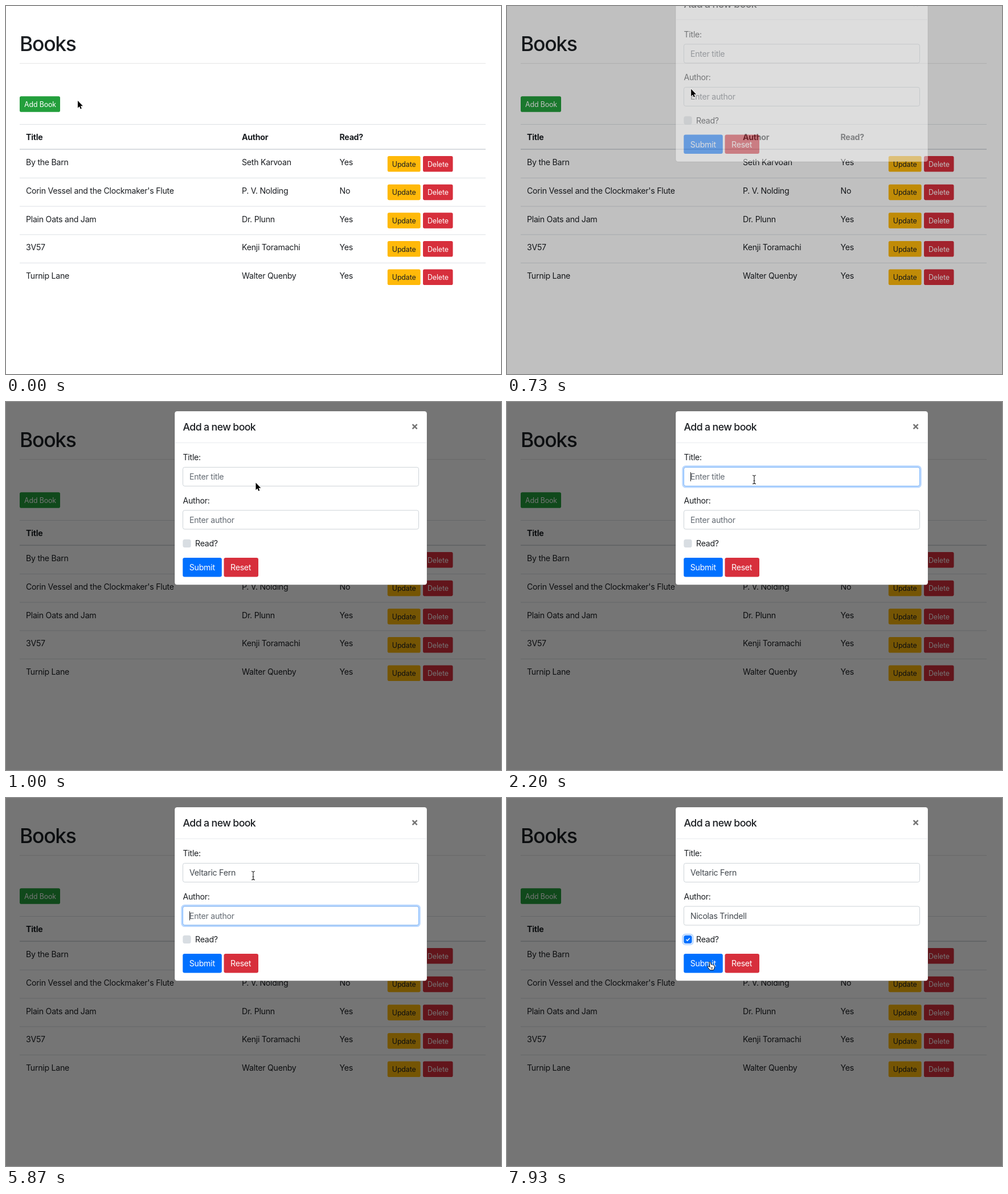
Write an HTML page that moves like this. It is 869x645 px and loops after 8 s.

```html
<!DOCTYPE html>
<html lang="en">
<head>
<meta charset="utf-8">
<title>Books</title>
<style>
  html, body { margin: 0; width: 100%; height: 100%; overflow: hidden; background: #fff; }
  svg { display: block; width: 869px; height: 645px; }
  text { font: 14.2px Inter, sans-serif; letter-spacing: -0.02em; fill: #1b1e22; white-space: pre; }
  .h1 { font-size: 35.5px; font-weight: 500; letter-spacing: -0.037em; }
  .h5 { font-size: 17.75px; font-weight: 500; letter-spacing: -0.036em; }
  .th { font-weight: 700; }
  .small { font-size: 12.4px; letter-spacing: -0.01em; }
  .light { fill: #fff; }
  .hint { fill: #646b73; }
  .value { fill: #41474d; }
</style>
</head>
<body>
<svg viewBox="0 0 869 645">
  <g id="page"></g>
  <rect id="backdrop" width="869" height="645"/>
  <g id="modal"></g>
  <g id="cursor">
    <path id="arrow" d="M0 0V12.7L2.9 10 4.8 14.4 6.8 13.5 4.9 9.3H8.9Z" stroke="#fff" stroke-width="1.2" paint-order="stroke"/>
    <g id="beam" fill="none">
      <path d="M-3-7.5Q0-7.5 0-5.5Q0-7.5 3-7.5M0-5.5V5.5M-3 7.5Q0 7.5 0 5.5Q0 7.5 3 7.5M-1.5 2H1.5" stroke="#fff" stroke-width="2.4"/>
      <path d="M-3-7.5Q0-7.5 0-5.5Q0-7.5 3-7.5M0-5.5V5.5M-3 7.5Q0 7.5 0 5.5Q0 7.5 3 7.5M-1.5 2H1.5" stroke="#222" stroke-width="1.1"/>
    </g>
    <path id="hand" d="M-1 1Q0-.6 1.2 1L2.3 5Q3.5 4.2 4.3 5.4Q5.6 4.8 6.3 6Q8 5.7 8.3 7.5V10.5L6.8 14.5H.3L-3.8 9.3Q-4.2 7.3-2 8L.2 9.3ZM2.5 9.5V12.5M4.5 9.5V12.5" fill="#fff" stroke="#111" stroke-width="1" stroke-linejoin="round"/>
  </g>
</svg>
<script>
const LOOP = 8000;
const $ = id => document.getElementById(id);
const GREEN = '#239f3c', YELLOW = '#ffb909', RED = '#d72f3c', BLUE = '#0070ff';

const text = (x, y, label, cls = '', id = '') =>
  `<text x="${x}" y="${y}" class="${cls}" id="${id}">${label}</text>`;
const box = (x, y, w, h, attrs, r = 3.2) =>
  `<rect x="${x}" y="${y}" width="${w}" height="${h}" rx="${r}" ${attrs}/>`;
const rule = (x1, x2, y, color, w = 0.9) =>
  `<path d="M${x1} ${y}H${x2}" stroke="${color}" stroke-width="${w}"/>`;
const smallButton = (x, y, w, fill, label, cls = '') =>
  box(x, y, w, 27.5, `fill="${fill}"`, 2.8) + text(x + 8, y + 18.6, label, 'small ' + cls);

const books = [
  ['By the Barn', 'Seth Karvoan', 'Yes'],
  ["Corin Vessel and the Clockmaker's Flute", 'P. V. Nolding', 'No'],
  ['Plain Oats and Jam', 'Dr. Plunn', 'Yes'],
  ['3V57', 'Kenji Toramachi', 'Yes'],
  ['Turnip Lane', 'Walter Quenby', 'Yes']
];
const columns = [35, 414, 585.5];
const ROW = 49.65;

function buildPage() {
  let page = text(24, 79, 'Books', 'h1') + rule(24, 842, 100.7, '#e3e3e3') +
    smallButton(24, 158.2, 71, GREEN, 'Add Book', 'light') +
    rule(24, 842, 207.5, '#dadee2') + rule(24, 842, 251.2, '#d4d8dc', 1.8);
  ['Title', 'Author', 'Read?'].forEach((label, i) => page += text(columns[i], 234.6, label, 'th'));
  books.forEach((book, row) => {
    const dy = row * ROW;
    if (row) page += rule(24, 842, 251.8 + dy, '#dadee2');
    book.forEach((cell, i) => page += text(columns[i], 279.2 + dy, cell));
    page += smallButton(669.8, 263 + dy, 57.8, YELLOW, 'Update') +
      smallButton(732, 263 + dy, 52.5, RED, 'Delete', 'light');
  });
  $('page').innerHTML = page;
}

function field(id, y, label, hint) {
  return text(310.5, y - 12, label) +
    box(310.5, y + 0.4, 414, 33, 'fill="#fff" stroke="#c8ced4" stroke-width=".9"') +
    `<g id="${id}-focus">` +
    box(308.7, y - 1.4, 417.6, 36.6, `fill="none" stroke="${BLUE}" stroke-opacity=".27" stroke-width="2.8"`, 5) +
    box(310.5, y + 0.4, 414, 33, 'fill="none" stroke="#7ab6ff"') + '</g>' +
    text(322, y + 22.3, hint, 'hint', id + '-hint') + text(322, y + 22.3, '', 'value', id) +
    `<path id="${id}-caret" d="M.5 ${y + 9}v16" stroke="#222"/>`;
}

function buildModal() {
  $('modal').innerHTML =
    box(296, 16, 443, 304.5, 'fill="#fff" stroke="#000" stroke-opacity=".2" stroke-width=".9"', 4.3) +
    text(310.5, 50, 'Add a new book', 'h5') +
    '<path d="M713.6 39.1l8 8m0-8l-8 8" stroke="#747474" stroke-width="2.5"/>' +
    rule(296.5, 738.5, 71.4, '#e6e9ec') +
    field('title', 114, 'Title:', 'Enter title') +
    field('author', 189.5, 'Author:', 'Enter author') +
    box(310.4, 240.8, 14.2, 14.2, 'fill="#d8dde2"', 3.5) +
    '<g id="checked">' +
    box(308.4, 238.8, 18.2, 18.2, `fill="#fff" stroke="${BLUE}" stroke-opacity=".28" stroke-width="2.2"`, 5) +
    box(310.4, 240.8, 14.2, 14.2, `fill="${BLUE}"`, 3.5) +
    '<path d="M314.6 248l2.1 2.1 3.9-4.3" fill="none" stroke="#fff" stroke-width="1.6"/></g>' +
    text(332, 253.2, 'Read?') +
    box(310.3, 273, 68.5, 33.5, `fill="${BLUE}"`) + text(321.8, 295.2, 'Submit', 'light') +
    box(382.5, 273, 60.5, 33.5, `fill="${RED}"`) + text(394, 295.2, 'Reset', 'light');
}

// Times at which each typed step lands, and the text length after it.
const typing = {
  title: { value: 'Veltaric Fern', focus: [2010, 5540],
    steps: [2530, 2800, 3000, 3270, 3670, 3800, 3930, 4070, 4270, 4670, 4800, 5070, 5200].map((t, i) => [t, i + 1]) },
  author: { value: 'Nicolas Trindell', focus: [5540, 7190],
    steps: [[6000, 1], [6070, 3], [6270, 5], [6330, 7], [6400, 8], [6600, 10],
      [6670, 11], [6730, 12], [6800, 14], [6870, 15], [6930, 16]] }
};

// time, x, y, shape
const pointer = [
  [0, 126, 166, 'arrow'], [70, 126, 166, 'arrow'], [270, 90, 168, 'hand'], [400, 74, 171, 'hand'],
  [590, 74, 171, 'hand'], [650, 150, 160, 'arrow'], [730, 321.5, 145.5, 'arrow'], [800, 438.5, 141.5, 'arrow'],
  [1010, 438.5, 141.5, 'arrow'], [1200, 431, 128, 'beam'], [1330, 430, 127, 'beam'], [2000, 430, 127, 'beam'],
  [2200, 434, 136, 'beam'], [2530, 434, 136, ''], [5860, 434, 136, 'beam'], [5930, 434, 136, 'beam'],
  [6070, 460, 178, 'beam'], [6270, 460, 178, ''], [6920, 460, 175, 'beam'], [7070, 440, 195, 'arrow'],
  [7200, 314, 244, 'arrow'], [7790, 314, 244, 'arrow'], [7870, 338, 272, 'hand'],
  [7930, 356, 287, 'hand'], [LOOP, 356, 287, 'hand']
];

const ramp = (t, from, length = 150) => Math.min(1, Math.max(0, (t - from) / length));

function drawField(id, t) {
  const { value, focus: [on, off], steps } = typing[id];
  const count = steps.reduce((n, [at, length]) => t >= at ? length : n, 0);
  const node = $(id);
  node.textContent = value.slice(0, count);
  $(id + '-hint').style.display = count ? 'none' : '';
  $(id + '-focus').style.opacity = ramp(t, on) - ramp(t, off);
  const caret = $(id + '-caret');
  caret.style.display = t >= on && t < off ? '' : 'none';
  caret.setAttribute('transform', `translate(${322 + (count ? node.getComputedTextLength() : 0)})`);
}

function drawPointer(t) {
  const i = pointer.findIndex((key, n) => n && t < key[0]) - 1;
  const [t0, x0, y0, shape] = pointer[i], [t1, x1, y1] = pointer[i + 1];
  const k = (t - t0) / (t1 - t0);
  $('cursor').setAttribute('transform', `translate(${x0 + (x1 - x0) * k} ${y0 + (y1 - y0) * k})`);
  for (const name of ['arrow', 'beam', 'hand']) $(name).style.display = name === shape ? '' : 'none';
}

function draw(t) {
  const fade = ramp(t, 662);
  const lift = 76 * (1 - ramp(t, 662, 300)) ** 1.8;
  $('backdrop').style.opacity = 0.54 * fade;
  $('modal').style.opacity = fade;
  $('modal').setAttribute('transform', `translate(0 ${-lift})`);
  drawField('title', t);
  drawField('author', t);
  $('checked').style.opacity = ramp(t, 7220);
  drawPointer(t);
}

buildPage();
buildModal();
function tick() {
  draw(performance.now() % LOOP);
  requestAnimationFrame(tick);
}
tick();
</script>
</body>
</html>
```
